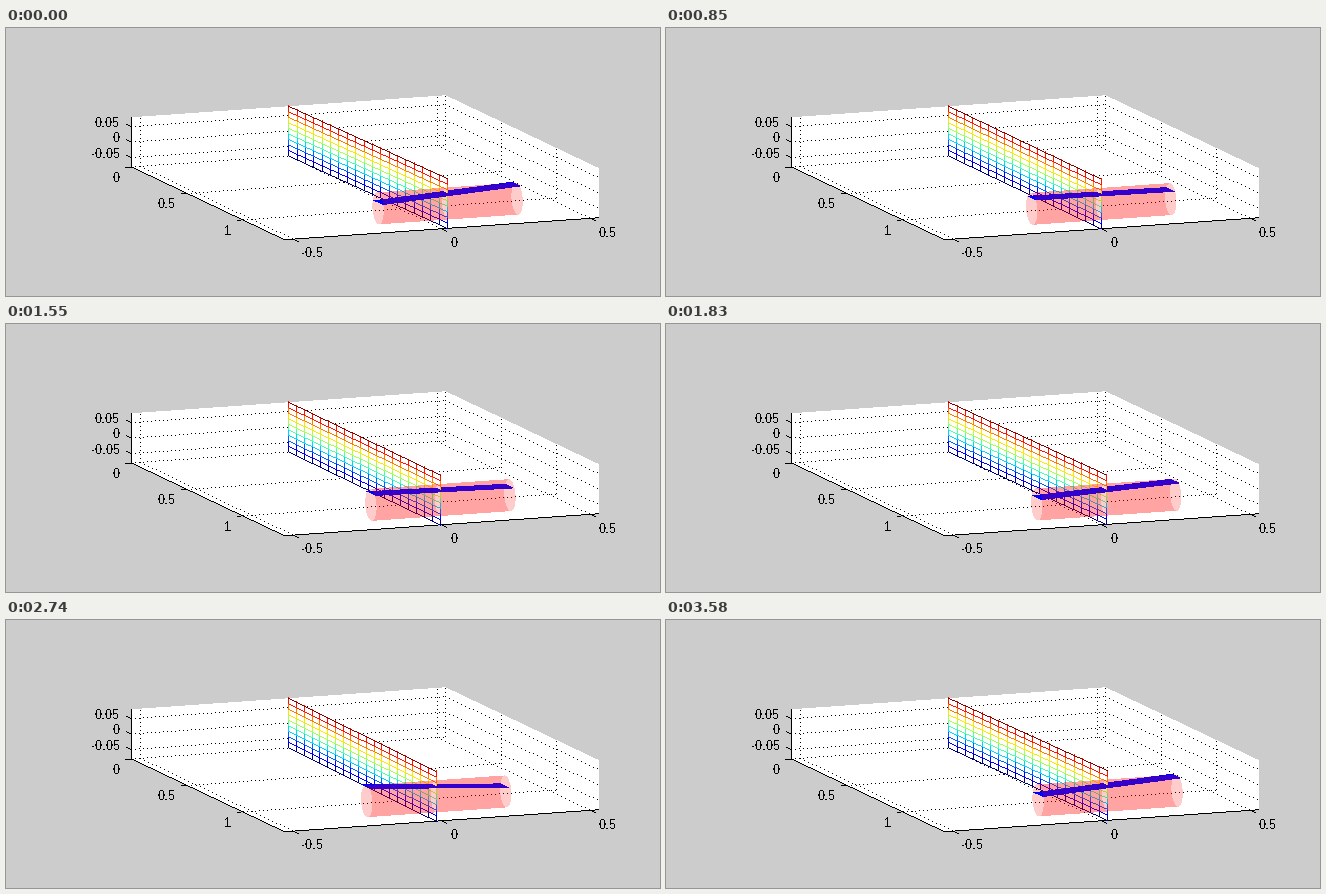
Recreate the animation shown at these times as a matplotlib script. Size 654x268 px, loop 3650 ms.

```python
import numpy as np
import matplotlib.pyplot as plt
from matplotlib.animation import FuncAnimation
from matplotlib.path import Path

W, H, DPI = 654, 268, 100
PX = 72 / DPI                      # one pixel in points
TICK_MS, LOOP_MS = 10, 3650
HOLD_MS, STEP_MS, STEPS = 500, 70, 45

# Orthographic projection: screen position of the origin and of each unit
ORIGIN = np.array([282.3, 102.6])
EX = np.array([297.0, -20.8])
EY = np.array([111.2, 52.9])
EZ = np.array([0.0, -309.0])
XM, YM, ZM = 0.528, 1.376, 0.0805  # box limits

SWING = 0.0194                     # sideways travel of the arm's end
HALF, RADIUS = 0.234, 0.051        # tank
LEVEL, SLOSH, WIDTH = 0.0328, 0.0147, 0.043
ROWS, COLS = 10, 20

GREY, WHITE, BLACK = (0.8, 0.8, 0.8), (1, 1, 1), (0, 0, 0)
RED, BLUE = (1, 0, 0), (0, 0, 1)

plt.rcParams["text.hinting"] = "native"
plt.rcParams["text.hinting_factor"] = 1


def proj(x, y, z):
    x, y, z = np.broadcast_arrays(x, y, z)
    return (ORIGIN + x[..., None] * EX + y[..., None] * EY
            + z[..., None] * EZ)


# Hard-edged drawing on a pixel canvas

def fill(img, pts, color, alpha=1.0):
    pts = np.asarray(pts)
    x0, y0 = np.floor(pts.min(axis=0)).astype(int)
    x1, y1 = np.ceil(pts.max(axis=0)).astype(int) + 1
    gy, gx = np.mgrid[y0:y1, x0:x1]
    grid = np.column_stack([gx.ravel(), gy.ravel()])
    inside = Path(pts).contains_points(grid).reshape(gx.shape)
    part = img[y0:y1, x0:x1]
    part[inside] = (1 - alpha) * part[inside] + alpha * np.array(color)


def line(img, a, b, color=BLACK, gap=1):
    """One-pixel line; a larger gap leaves only every gap-th pixel."""
    length = np.abs(b - a).max()
    t = np.arange(0, np.rint(length) + 1, gap) / length
    x, y = np.rint(a + t[:, None] * (b - a)).astype(int).T
    img[y, x] = color


def draw_box(img):
    walls = [(-XM, 0, ZM), (XM, 0, ZM), (XM, YM, ZM),
             (XM, YM, -ZM), (-XM, YM, -ZM), (-XM, 0, -ZM)]
    fill(img, [proj(*c) for c in walls], WHITE)

    def dotted(a, b):
        line(img, proj(*a), proj(*b), gap=4)

    for x in (-0.5, 0, 0.5):
        dotted((x, 0, -ZM), (x, 0, ZM))
        dotted((x, 0, -ZM), (x, YM, -ZM))
    for y in (0, 0.5, 1):
        dotted((XM, y, -ZM), (XM, y, ZM))
        dotted((-XM, y, -ZM), (XM, y, -ZM))
    for z in (-0.05, 0, 0.05):
        dotted((-XM, 0, z), (XM, 0, z))
        dotted((XM, 0, z), (XM, YM, z))


def draw_axes(img, ax):
    corners = [proj(*c) for c in walls_edge]
    for a, b in zip(corners, corners[1:]):
        line(img, a, b)
    ux, uy = EX / np.hypot(*EX), EY / np.hypot(*EY)

    def tick(pos, out, value, shift, ha):
        p = proj(*pos)
        line(img, p, p + 6 * out)
        x, y = p + shift
        ax.text(x, y + 4.7, f"{value:g}", ha=ha, va="baseline",
                family="Liberation Sans", size=13 * PX, color="black",
                antialiased=False)

    for v in (-0.5, 0, 0.5):
        tick((v, YM, -ZM), uy, v, (8.3, 13.5), "left")
    for v in (0, 0.5, 1):
        tick((-XM, v, -ZM), -ux, v, (-12.5, 10), "right")
    for v in (-0.05, 0, 0.05):
        tick((-XM, 0, v), -uy, v, (-12, -4.5), "right")


walls_edge = [(-XM, 0, ZM), (-XM, 0, -ZM), (-XM, YM, -ZM), (XM, YM, -ZM)]

# Angle at which the tank's outline runs parallel to its axis
slope = EX[1] / EX[0]
EDGE = np.arctan2(-EZ[1], -(EY[1] - slope * EY[0]))
FRONT = np.linspace(EDGE - np.pi, EDGE, 40)
BACK = FRONT + np.pi


def shell(x0, x1, arc):
    y, z = YM + RADIUS * np.cos(arc), RADIUS * np.sin(arc)
    return np.vstack([proj(x0, y, z), proj(x1, y, z)[::-1]])


def level(x0, x1, mid, tilt):
    z0, z1 = (LEVEL + tilt * (x - mid) / HALF for x in (x0, x1))
    a, b = YM - WIDTH, YM + WIDTH
    return [proj(x0, a, z0), proj(x0, b, z0), proj(x1, b, z1), proj(x1, a, z1)]


def draw_tank(img, x0, x1, mid, tilt):
    fill(img, shell(x0, x1, BACK), RED, 0.2)
    fill(img, level(x0, x1, mid, tilt), BLUE)
    fill(img, shell(x0, x1, FRONT), RED, 0.2)


def draw_arm(img, mid):
    s = np.linspace(0, 1, COLS)[:, None]
    pts = proj(mid * s, YM * s, np.linspace(-ZM, ZM, ROWS))
    colors = plt.get_cmap("jet")(np.linspace(0, 1, ROWS))[:, :3]
    fill(img, [pts[0, 0], pts[-1, 0], pts[-1, -1], pts[0, -1]], WHITE)
    for col in pts:
        for a, b, color in zip(col, col[1:], colors):
            line(img, a, b, color)
    for j, color in enumerate(colors):
        line(img, pts[0, j], pts[-1, j], color)


def draw_scene(step):
    c = np.cos(4 * np.pi * step / STEPS)
    mid, tilt = SWING * c, SLOSH * c
    img = stage.copy()
    # The arm hides the far half of the tank; the near half lies over the arm
    draw_tank(img, mid, mid + HALF, mid, tilt)
    draw_arm(img, mid)
    draw_tank(img, mid - HALF, mid, mid, tilt)
    return img


fig = plt.figure(figsize=(W / DPI, H / DPI), dpi=DPI, facecolor=GREY)
ax = fig.add_axes([0, 0, 1, 1])
ax.axis("off")

stage = np.full((H, W, 3), GREY, dtype=float)
draw_box(stage)
draw_axes(stage, ax)
scenes = [draw_scene(k) for k in range(STEPS + 1)]
view = ax.imshow(scenes[0], interpolation="nearest", aspect="auto")


def update(i):
    t = i * TICK_MS
    step = 0 if t < HOLD_MS else (t - HOLD_MS) // STEP_MS + 1
    view.set_data(scenes[step])
    return [view]


anim = FuncAnimation(fig, update, frames=LOOP_MS // TICK_MS, interval=TICK_MS,
                     init_func=lambda: update(0), repeat=True, repeat_delay=0,
                     blit=False)
plt.show()
```
